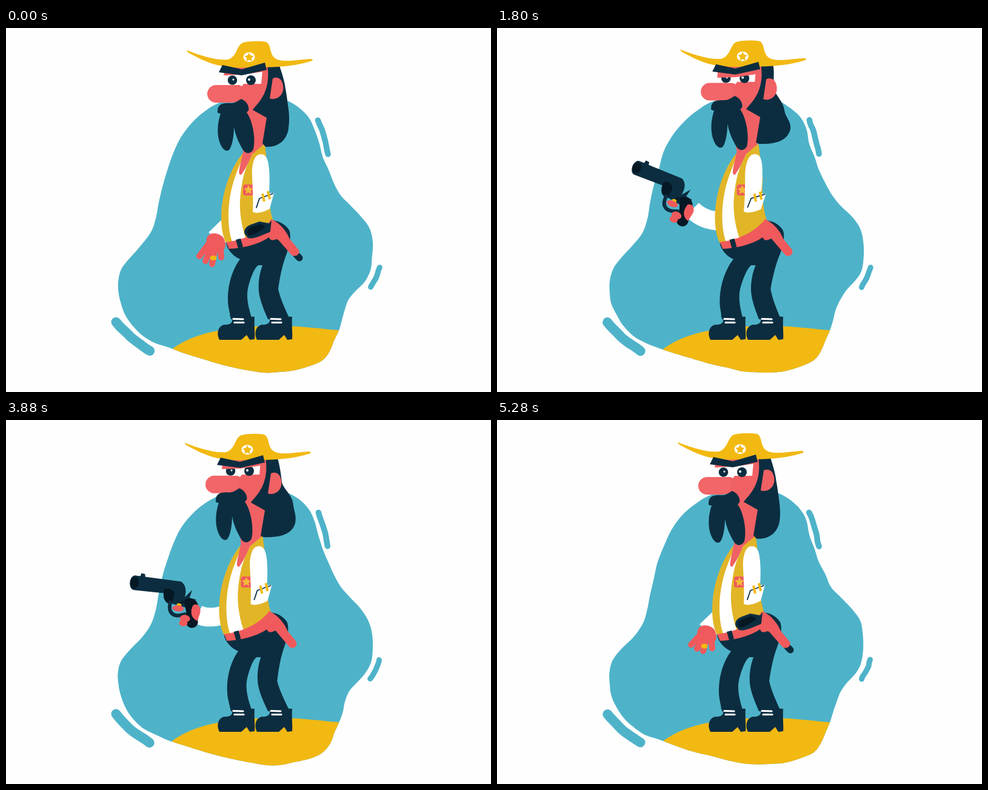
Write an HTML page that moves like this. It is 800 px wide and 600 px high and loops after 5.32 s.

```html
<!DOCTYPE html>
<html lang="en">
<head>
<meta charset="utf-8">
<title>Sheriff</title>
<style>
html, body { margin: 0; width: 100%; height: 100%; overflow: hidden; background: #fefefe; }
svg { display: block; width: 100vw; height: 100vh; }
.sky { fill: #4eb3c9; }
.mark { fill: none; stroke: #4eb3c9; stroke-linecap: round; }
.gold { fill: #f2b912; }
.vest { fill: #e2b527; }
.ink { fill: #0c2d40; }
.deep { fill: #051824; }
.skin { fill: #f06164; }
.belt { fill: #f05a5c; }
.white { fill: #fff; }
.line { fill: none; stroke-linecap: round; stroke-linejoin: round; }
.flat { stroke-linecap: butt; }
</style>
</head>
<body>
<svg viewBox="0 0 800 600">
  <defs>
    <clipPath id="inside"><path id="clip"/></clipPath>
    <g id="revolver">
      <path class="ink" d="M188,247 L190,240 L196,241 L197,247Z"/>
      <path class="ink" d="M180,245 L256,247 C265,251 267,262 265,272 L276,259 L273,272 L284,274 L276,290 L246,285 L232,269 L180,269 C170,268 170,246 180,245Z"/>
      <path class="deep" d="M230,263 C238,258 248,262 247,272 L245,286 C234,286 228,278 230,263Z"/>
      <ellipse class="deep" cx="180" cy="257" rx="7" ry="9.5"/>
      <path class="line" d="M242,283 C240,300 249,309 268,300" stroke="#0c2d40" stroke-width="6"/>
      <path class="deep" d="M264,278 C272,270 284,272 288,282 L291,312 C290,322 278,324 273,317 L270,296Z"/>
      <path class="line" d="M262,280 Q256,284 258,291" stroke="#051824" stroke-width="4"/>
    </g>
    <g id="boot">
      <path class="ink" d="M369,474 L410,476 C409,490 411,505 410,513 L402,514 L397,506 L388,514 L352,514 C347,505 349,491 360,489 C368,490 374,486 373,481Z"/>
      <path class="line" stroke="#fff" stroke-width="3.2" d="M375,479.5 L391,480 M377,485.5 L392,485.5"/>
    </g>
  </defs>

  <path id="blob" class="sky"/>
  <path class="gold" clip-path="url(#inside)"
    d="M268,534 C308,500 370,492 440,491 C490,490 520,497 560,499 L560,585 L268,585Z"/>
  <path id="mark0" class="mark" stroke-width="9.5"/>
  <path id="mark1" class="mark" stroke-width="9"/>
  <path id="mark2" class="mark" stroke-width="16"/>
  <path id="smoke" class="line" stroke="#86d5e1" stroke-width="11"/>

  <g id="back"></g>

  <path id="pants" class="ink"/>
  <use href="#boot"/>
  <use href="#boot" x="62"/>

  <g id="body">
    <path class="vest" d="M391,206 C372,228 355,270 355,312 C355,330 358,345 363,354 L400,350 L441,318 C434,300 432,270 434,250 L427,192 L404,195Z"/>
    <path class="white" d="M390,216 C376,245 367,275 367,310 C367,330 370,345 374,354 L397,350 C389,330 385,305 386,285 C388,250 396,225 408,205 L391,207Z"/>
    <rect class="belt" x="391" y="258" width="18" height="18" rx="4"/>
    <path id="pocketStar" fill="#f2b93a"/>
    <path class="belt" d="M363,353 C392,350 422,336 438,315 C452,322 463,335 468,348 L482,365 C486,373 476,380 470,373 L448,347 C442,350 436,352 434,345 C416,357 390,363 368,364Z"/>
    <path class="ink" d="M379,349 L387,347 L391,361 L383,363Z"/>
    <g id="holstered">
      <path class="ink" d="M394,340 C391,333 396,327 404,324 L418,319 L434,322 L438,317 L441,331 L434,337 C420,342 408,349 399,346Z"/>
      <path class="deep" d="M398,338 C397,332 402,329 407,327 L420,323 L428,327 C420,335 408,342 400,342Z"/>
      <path class="line" d="M479,374 L484,379" stroke="#0c2d40" stroke-width="11"/>
      <path class="belt" d="M438,316 L468,348 L483,366 C486,372 478,379 471,374 L449,349 L435,345Z"/>
    </g>
    <g id="nearArm">
      <path class="white" d="M420,208 C409,208 405,226 406,245 C407,265 408,285 407,303 C413,307 426,303 435,298 L442,272 L434,272 C435,255 435,238 433,225 C431,212 427,208 420,208Z"/>
      <path class="line" d="M413,296 L418,281 L440,273" stroke="#0c2d40" stroke-width="1.8"/>
      <path class="line flat" d="M423,273 L426,286 M432,269 L435,282" stroke="#f2b912" stroke-width="4"/>
    </g>
  </g>

  <path id="neck" class="skin"/>
  <g id="front"></g>

  <g id="head">
    <path id="hair" class="ink"/>
    <path id="ear" class="skin" d="M440,83 C453,77 459,92 457,103 C454,116 441,119 435,116Z"/>
    <path id="face" class="skin" d="M362,74 L376,60 L431,60 C434,80 432,95 426,108 C420,121 412,128 406,136 L396,140 L375,118 L362,95Z"/>
    <g id="eyes">
      <path class="white" d="M360,79 L389,74 L423,70 L421,92 L392,92 L389,96 L385,94 L360,94Z"/>
      <circle class="ink" cx="373.5" cy="86" r="7.8"/>
      <circle class="ink" cx="404" cy="86" r="8"/>
      <circle class="white" cx="375" cy="85" r="1.5"/>
      <circle class="white" cx="401" cy="85" r="2"/>
      <path id="lid" class="skin"/>
    </g>
    <path class="gold" d="M299,37 C325,47 350,54 366,52 C381,47 380,31 389,25 C397,21 420,21 429,23 C438,27 434,43 444,50 C456,58 480,52 503,51 C508,52 506,54 502,55 C470,65 435,65 400,65 C350,68 325,54 300,40 C298,38 298,37 299,37Z"/>
    <ellipse class="white" cx="401" cy="48" rx="9.5" ry="8"/>
    <path id="hatStar" class="gold"/>
    <path id="brow" class="ink" d="M357,61 L389,68 L427,57 L430,69 L389,78 L351,73Z"/>
    <path id="nose" class="line" d="M346.5,108.5 L372,108.5" stroke="#f26568" stroke-width="29"/>
    <path id="stache" class="ink" d="M349,137 C349,126 357,123 370,124 C380,124 383,119 388,117 C397,120 402,130 400,136 L397,139 C408,155 412,185 408,200 C404,208 395,208 391,201 C383,188 378,175 376,163 C376,178 373,195 368,201 C362,205 356,198 353,190 C347,175 349,155 354,141 C350,141 348,139 349,137Z"/>
  </g>

  <g id="flash">
    <path id="burst" class="gold"/>
    <path id="core" class="white"/>
  </g>

  <g id="arm">
    <path id="sleeve" class="line flat" stroke="#fff" stroke-width="31"/>
    <g id="openHand">
      <path class="belt" d="M-13,-4 C-8,-12 6,-11 13,-3 C18,4 18,13 14,18 L-6,18 C-14,14 -17,4 -13,-4Z"/>
      <path id="fingers" class="line" stroke="#f05a5c" stroke-width="10"/>
      <ellipse id="ring" class="gold" cx="-3" rx="5.5" ry="4"/>
    </g>
    <use id="ghost" href="#revolver" opacity=".42"/>
    <g id="gun">
      <use href="#revolver"/>
      <g id="grip" class="belt">
        <ellipse class="gold" cx="257" cy="286" rx="4" ry="3"/>
        <ellipse cx="256" cy="291.5" rx="9.5" ry="5"/>
        <ellipse cx="269" cy="307" rx="8.5" ry="6"/>
        <ellipse cx="267" cy="315" rx="7" ry="5"/>
        <path d="M280,284 C286,279 294,284 293,295 L290,309 C281,306 275,298 280,284Z"/>
      </g>
    </g>
    <g id="palm">
      <path class="belt" d="M262,285 C268,280 278,288 288,287 L303,281 L326,279 C330,292 318,305 303,312 C290,314 279,304 282,294 C274,294 264,291 262,285Z"/>
      <path class="white" d="M301,285 C308,280 315,281 317,287 C312,290 306,290 301,285Z"/>
      <ellipse class="gold" cx="281" cy="288" rx="4" ry="6"/>
    </g>
  </g>
</svg>
<script>
const LOOP = 5320, STEP = 40, TAU = Math.PI * 2;
const $ = id => document.getElementById(id);
const put = (id, d) => $(id).setAttribute('d', d);
const move = (id, s) => $(id).setAttribute('transform', s);
const show = (id, on) => { $(id).style.display = on ? '' : 'none'; };
const at = (x, y) => `translate(${n(x)} ${n(y)})`;
const n = v => v.toFixed(1);
const clamp = v => Math.max(0, Math.min(1, v));
const mix = (a, b, k) => a.map((v, i) => v + (b[i] - v) * k);

// amounts of each action, 0 to 1
function pose(t) {
  const ramp = (a, b) => {
    const p = clamp((t - a) / (b - a));
    return p * p * (3 - 2 * p);
  };
  const shot = ramp(1640, 1720), holster = ramp(4720, 5040);
  return {
    squint: ramp(500, 760) - holster,
    reach: ramp(1160, 1280),
    pull: ramp(1290, 1440),
    aim: ramp(1280, 1500) - shot,
    shot,
    kick: shot - ramp(1720, 1920),
    settle: ramp(1720, 1960),
    rest: ramp(1800, 2080) - holster,
    twirl: ramp(3980, 4160),
    spin: ramp(3980, 4160) - ramp(4640, 4800),
    stow: ramp(4720, 4880),
    home: ramp(4880, 5040)
  };
}

const warp = (d, fn) => d.replace(/(-?[\d.]+),(-?[\d.]+)/g, (m, x, y) => fn(+x, +y).map(n).join(','));

function noise(i, seed) {
  const v = Math.sin(i * 127.1 + seed * 311.7) * 43758.5453;
  return (v - Math.floor(v)) * 2 - 1;
}

// points along a Catmull-Rom spline
function spline(pts, closed, cuts) {
  const len = pts.length, out = [];
  const get = i => pts[closed ? (i + len) % len : Math.max(0, Math.min(len - 1, i))];
  for (let i = 0; i < (closed ? len : len - 1); i++) {
    const [a, b, c, d] = [-1, 0, 1, 2].map(k => get(i + k));
    for (let s = 0; s < cuts; s++) {
      const u = s / cuts;
      out.push(b.map((v, k) => v + u * .5 * (c[k] - a[k] +
        u * (2 * a[k] - 5 * v + 4 * c[k] - d[k] + u * (3 * (v - c[k]) + d[k] - a[k])))));
    }
  }
  if (!closed) out.push(pts[len - 1]);
  return out;
}

// spline with a shaky, hand-cut edge
function rough(pts, closed, seed, amp) {
  const shaken = spline(pts, closed, 3).map((p, i) => p.map((v, k) => v + noise(i + k * 99, seed) * amp));
  return 'M' + spline(shaken, closed, 5).map(p => p.map(n)).join('L') + (closed ? 'Z' : '');
}

function star(cx, cy, rx, ry, count, inner) {
  const pts = Array.from({ length: count * 2 }, (_, i) => {
    const a = i * Math.PI / count - Math.PI / 2, k = i % 2 ? inner : 1;
    return [n(cx + Math.cos(a) * rx * k), n(cy + Math.sin(a) * ry * k)];
  });
  return 'M' + pts.join('L') + 'Z';
}

const BLOB = [[350, 124], [288, 180], [258, 262], [240, 336], [191, 397], [189, 455], [225, 507], [293, 536],
  [380, 561], [450, 568], [521, 548], [549, 497], [566, 448], [601, 400], [599, 331], [552, 275],
  [523, 213], [499, 146], [440, 114]];
const MARKS = [[[515, 152], [524, 178], [531, 208]], [[616, 395], [610, 412], [601, 427]], [[182, 485], [207, 511], [237, 532]]];
const PANTS = 'M363,355 C366,368 378,378 386,381 C372,400 363,430 367,460 L371,480 L406,480 C398,455 396,440 400,425 C404,410 410,395 416,391 L423,391 C416,410 415,430 419,445 C423,460 428,470 432,480 L468,480 C460,462 452,445 449,430 C452,410 455,395 460,380 C466,365 472,345 467,333 C460,322 445,316 437,318 L400,350Z';
const NECK = 'M394,134 L412,134 L432,146 L425,192 L406,208 C400,222 394,234 388,242 C384,242 384,238 385,232 L391,204 L386,160Z';
const HOME = [345, 348], HIP = [398, 338], AIM = [288, 300], KICK = [324, 292], REST = [316, 320], TWIRL = [310, 300];

put('hatStar', star(401, 48.5, 8, 8, 5, .5));
put('pocketStar', star(400, 267, 8, 8, 5, .5));

function drawScene(t) {
  const seed = Math.floor(t / 120);
  const d = rough(BLOB, true, seed, 1.1);
  put('blob', d);
  put('clip', d);
  MARKS.forEach((m, i) => put('mark' + i, rough(m, false, seed + i, .6)));
}

function drawSmoke(t) {
  const fade = Math.min(.8, .8 - .00053 * (t - 2200));
  const on = t >= 1900 && fade > 0;
  show('smoke', on);
  if (!on) return;
  const top = Math.max(-12, 255 - (t - 1900) * .49), pts = [];
  for (let y = 254; y >= top; y -= 4) {
    const sway = 8.5 * clamp((262 - y) / 40);
    pts.push([n(212 - sway * Math.cos((y - 193) * TAU / 61)), y]);
  }
  put('smoke', 'M' + pts.join('L'));
  $('smoke').style.opacity = fade;
}

function drawFlash(t) {
  const size = Math.sin(Math.PI * clamp((t - 1600) / 200));
  show('flash', size > .1);
  put('burst', star(172 - 65 * size, 254, 65 * size, 46 * size, 9, .55));
  put('core', star(172 - 50 * size, 254, 36 * size, 24 * size, 9, .55));
}

function drawBody(p, lean) {
  put('pants', warp(PANTS, (x, y) => {
    const k = y > 430 ? clamp((478 - y) / 96) : clamp(.5 + (430 - y) / 140);
    return [x + lean * k, y];
  }));
  move('body', at(lean, 0));
  move('nearArm', `rotate(${n(-28 * p.aim + 5 * p.kick)} 420 222)`);
}

function drawHead(t, p, lean) {
  const hx = -27 * p.aim + 8 * p.kick - 2 * p.rest - p.squint;
  const hy = 2.5 * p.aim - 2 * p.kick + p.rest;
  const up = p.rest + p.kick;
  move('head', at(hx, hy));
  move('ear', at(0, 4 * up - 12 * p.aim));
  move('face', at(0, 6 * p.aim));
  move('eyes', at(0, 5 * p.aim - 3 * up));
  move('brow', at(0, 5 * p.aim));
  move('nose', at(0, 9.5 * p.aim - 3.3 * up));
  move('stache', at(6 * p.aim, 6 * p.aim - 5.5 * up));

  const lid = 4 * p.squint + 4 * p.aim + 5 * p.kick + p.rest + 3 * p.spin;
  put('lid', `M361,66 L426,62 L424,${n(72 + lid)} L390,${n(77 + lid)} L359,${n(78 + lid)}Z`);

  // a wave runs down the hair
  const a = TAU * t / (LOOP / 2) - .38;
  const root = 459 + 6 * Math.cos(a - .8);
  const mid = 471 + 6 * Math.cos(a - 2.1);
  const low = 474.5 - 8.5 * Math.cos(a);
  const end = 196 - (low - 466) * .25;
  put('hair', `M424,60 L451,62 C454,72 ${n(root - 2)},85 ${n(root)},102 ` +
    `C${n(root + 2)},112 ${n(mid - 2)},122 ${n(mid)},136 ` +
    `C${n(mid + 1)},148 ${n(low + 1)},155 ${n(low - 1)},168 ` +
    `C${n(low - 5)},${n(end - 8)} ${n(low - 20)},${n(end + 1)} 428,${n(end)} L423,190 L430,148 L405,134 L426,108Z`);

  put('neck', warp(NECK, (x, y) => {
    const k = clamp((y - 150) / 55);
    return [x + hx + (lean - hx) * k, y + hy * (1 - k)];
  }));
}

function wrist(p) {
  const steps = [[HIP, p.reach], [AIM, p.pull], [KICK, p.shot], [REST, p.settle], [TWIRL, p.twirl], [HIP, p.stow], [HOME, p.home]];
  return steps.reduce((pos, [to, k]) => mix(pos, to, k), HOME);
}

function drawArm(t, p, lean) {
  const [wx, wy] = wrist(p);
  const armed = t >= 1280 && t < 4880;
  const spinning = t >= 4080 && t < 4760;
  const crossing = (p.reach > 0 && p.pull < .8) || (p.stow > 0 && p.home < 1);
  const layer = $(crossing ? 'front' : 'back');
  if ($('arm').parentNode !== layer) layer.appendChild($('arm'));

  const ex = 372 + lean, ey = armed ? 318 : 322, sag = armed ? 12 : 0;
  put('sleeve', `M${n(ex)},${ey} Q${n((ex + wx - sag) / 2)},${n((ey + wy) / 2 + sag)} ${n(wx)},${n(wy)}`);

  show('openHand', !armed);
  show('holstered', !armed);
  show('gun', armed);
  show('grip', !spinning);
  show('palm', spinning);
  show('ghost', spinning && t > 4120 && t < 4720);

  const held = 150 * (p.pull - 1) + 32 * p.kick + 6 * p.rest;
  const angle = t < 4040 ? held : Math.max(-870, 6 - 1.276 * (t - 4040));
  const gx = wx - 32 + 3 * p.spin, gy = wy - 11 - 9 * p.spin;
  const place = (x, y, deg) => `${at(x, y)} rotate(${n(deg)}) translate(-256 -290)`;
  move('gun', place(gx, gy, angle));
  move('ghost', place(gx - 12, gy - 9, angle + 174));
  move('palm', at(wx - TWIRL[0], wy - TWIRL[1]));

  move('openHand', at(wx, wy));
  const idle = t < LOOP / 2 ? t : t - LOOP;
  const k = .8 + .2 * Math.cos(idle * TAU / 160);
  put('fingers', `M-8,4 L${-20 - 6 * k},${28 * k} M-4,8 L${-12 - 4 * k},${36 * k} M1,10 L-5,${41 * k} M8,8 L10,${22 + 8 * k}`);
  $('ring').setAttribute('cy', 31 * k);
}

function draw(t) {
  const p = pose(t);
  const lean = -18 * p.aim + 7 * p.kick - 3.5 * p.rest + 4 * p.spin;
  drawScene(t);
  drawSmoke(t);
  drawFlash(t);
  drawBody(p, lean);
  drawHead(t, p, lean);
  drawArm(t, p, lean);
}

const start = performance.now();
function tick() {
  const t = (performance.now() - start) % LOOP;
  draw(Math.floor(t / STEP) * STEP);
  requestAnimationFrame(tick);
}
tick();
</script>
</body>
</html>
```
